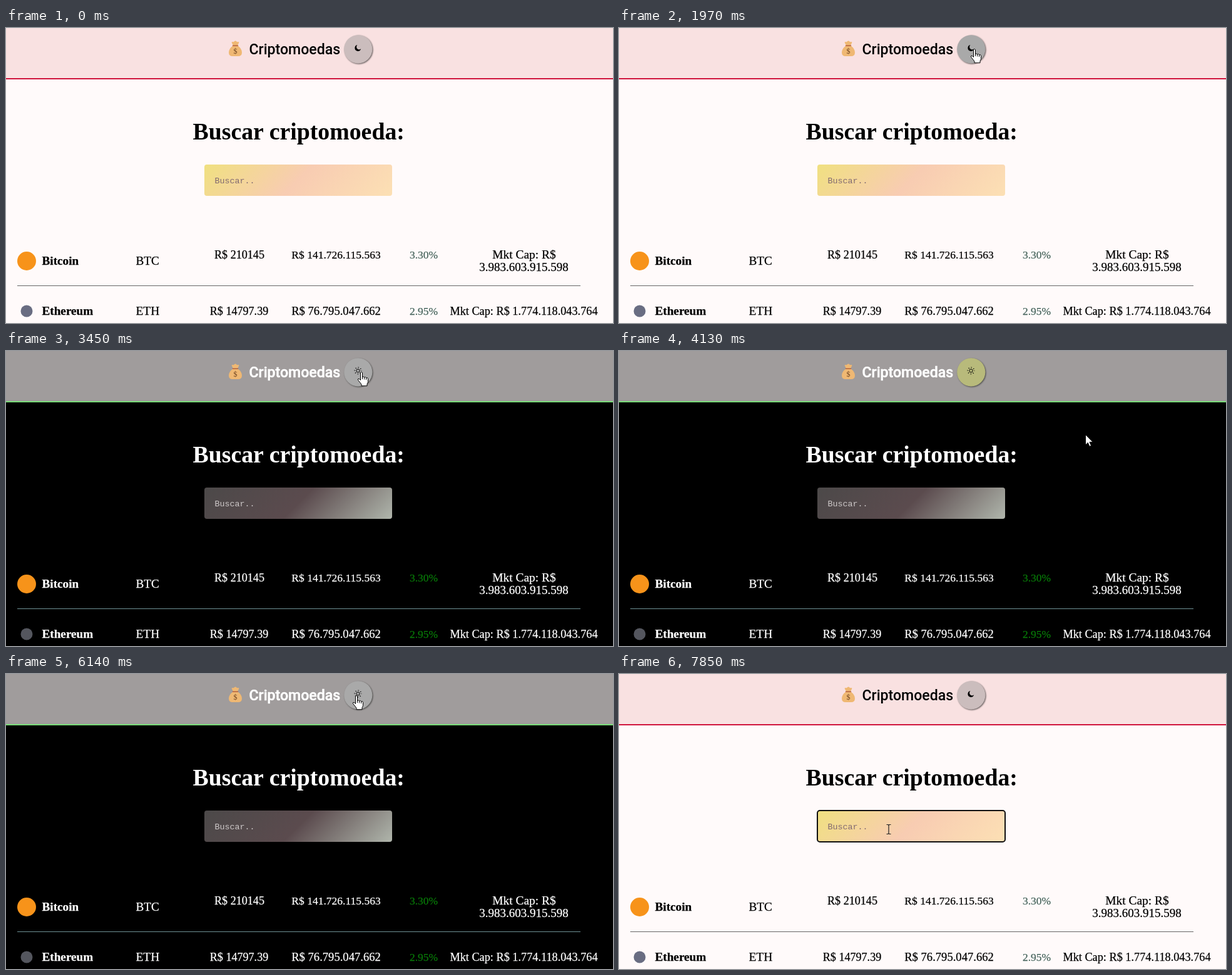
Recreate the animation shown at these times as an HTML page. Size 970 px wide and 471 px high, loop 8000 ms.

```html
<!DOCTYPE html>
<html lang="pt-BR">
<head>
<meta charset="utf-8">
<title>Criptomoedas</title>
<style>
  html, body { margin: 0; width: 100%; height: 100%; overflow: hidden; }
  svg {
    --page: #fffafa; --ink: #000; --header: #f9e1e1; --edge: #d0143c;
    --button: #cbbdbd; --shadow: #5c5555; --rule: #666; --gain: #46645c;
    --hint: #806870; --coin: #696d82;
    --from: #f0e080; --mid: #f8ccb2; --to: #fce0b4;
    display: block; background: var(--page); fill: var(--ink);
    font-family: "Liberation Serif", serif;
  }
  svg.dark {
    --page: #000; --ink: #fff; --header: #a09c9c; --edge: #78dc78;
    --button: #b8ba7b; --shadow: #4a4a48; --rule: #6f9296; --gain: #087a08;
    --hint: #cfcaca; --coin: #54565e;
    --from: #4c4949; --mid: #5b4b4e; --to: #b0b6ac;
  }
  svg.hover { --button: #a9a9a9; }
  .rows { stroke: var(--ink); stroke-width: .25; }
  .logo { font: 500 23.1px Roboto, sans-serif; }
  .dark .logo { stroke: var(--ink); stroke-width: .5; }
  .title { font-size: 37.8px; font-weight: bold; }
  .hint { font: 13.33px "Liberation Mono", monospace; fill: var(--hint); }
  .name { font-size: 19.2px; font-weight: bold; }
  .mid { text-anchor: middle; }
  .gain { fill: var(--gain); stroke: var(--gain); }
  .button { fill: var(--button); filter: drop-shadow(1px 1px 1px var(--shadow)); }
  .sun, .dark .moon { display: none; }
  .dark .sun { display: inline; }
  .sun { fill: none; stroke: #000; stroke-width: 1; }
  .moon { fill: #000; }
  #focus { fill: none; stroke: #101010; stroke-width: 2; }
  #arrow, #hand { fill: #fff; stroke: #000; stroke-width: 1; stroke-linejoin: round; }
  #beam { fill: none; stroke: #222; stroke-width: 1.2; }
</style>
</head>
<body>
<svg id="stage" width="970" height="471" viewBox="0 0 970 471">
  <defs>
    <linearGradient id="field" gradientUnits="userSpaceOnUse" x1="379.5" y1="155.5" x2="554.5" y2="330.5">
      <stop offset="0" stop-color="var(--from)"/>
      <stop offset=".5" stop-color="var(--mid)"/>
      <stop offset="1" stop-color="var(--to)"/>
    </linearGradient>
  </defs>

  <rect width="970" height="80" fill="var(--header)"/>
  <rect y="80" width="970" height="2" fill="var(--edge)"/>

  <!-- money bag -->
  <path d="M362 22q2 1 3-1 2-1 3 0 1 2 3 1 2 0 1 2l-2 4q7 5 7 11 0 6-6 6h-9q-6 0-6-6 0-6 7-11l-2-4q-1-2 1-2z" fill="#efb873"/>
  <path d="M362.5 28.3h8" stroke="#b5603c" stroke-width="1.6" stroke-linecap="round"/>
  <text class="mid" x="366.5" y="40.5" font-size="12" fill="#704522">$</text>
  <text class="logo" x="388.5" y="42">Criptomoedas</text>

  <circle class="button" cx="562.8" cy="33.8" r="22.6"/>
  <path class="moon" d="M561.5 27a5 5 0 1 0 5.7 6.3a4.2 4.2 0 0 1-5.7-6.3z"/>
  <g class="sun">
    <circle cx="562.5" cy="31.5" r="2.6"/>
    <circle cx="562.5" cy="31.5" r="5.2" stroke-width="1.8" stroke-dasharray="1 3.084" stroke-dashoffset=".5"/>
  </g>

  <text class="title" x="298.5" y="178">Buscar criptomoeda:</text>
  <rect x="317" y="218" width="300" height="50" rx="4" fill="url(#field)"/>
  <rect id="focus" x="317" y="218" width="300" height="50" rx="4"/>
  <text class="hint" x="333.5" y="248">Buscar..</text>

  <circle cx="33" cy="372" r="15" fill="#f7931a"/>
  <circle cx="33" cy="452" r="9.5" fill="var(--coin)"/>
  <rect x="18" y="411" width="900" height="1" fill="var(--rule)"/>

  <g class="rows">
    <text class="name" x="57.5" y="378">Bitcoin</text>
    <text x="207.5" y="378" font-size="19.2">BTC</text>
    <g class="mid" font-size="18.1">
      <text x="373" y="368">R$ 210145</text>
      <text x="527.5" y="368" font-size="17.5">R$ 141.726.115.563</text>
      <text x="667.5" y="368" font-size="17.5" class="gain">3.30%</text>
      <text x="828" y="368" font-size="19.4">Mkt Cap: R$</text>
      <text x="827.5" y="388" font-size="19">3.983.603.915.598</text>
    </g>
    <text class="name" x="57.5" y="458">Ethereum</text>
    <text x="207.5" y="458" font-size="19.4">ETH</text>
    <g class="mid" font-size="18.1">
      <text x="372.5" y="458">R$ 14797.39</text>
      <text x="527.5" y="458" font-size="18.6">R$ 76.795.047.662</text>
      <text x="667.5" y="458" font-size="17.5" class="gain">2.95%</text>
      <text x="827.5" y="458" font-size="18.25">Mkt Cap: R$ 1.774.118.043.764</text>
    </g>
  </g>

  <g id="cursor">
    <path id="arrow" d="M.5.5v16.5l3.8-3.6 2.6 6 2.7-1.2-2.6-5.8h5.2z"/>
    <g id="hand">
      <path d="M-1.5 1.5q1.5-2 3 0v7q2-1.2 3 .5 2-1 3 .7 3-.7 3 2v4q0 2-1.5 4v3h-9v-2.5l-5.5-7q-.5-2.5 2-1.7l2 2z"/>
      <path d="M1.500 8v4M4.500 9v3.500M7.500 10v3" fill="none"/>
    </g>
    <path id="beam" d="M-3.500-7.500h2.500l1 1 1-1h2.500M0-6.500v13M-3.500 7.500h2.500l1-1 1 1h2.500"/>
  </g>
</svg>
<script>
const LOOP = 8000, STEP = 70;
const DARK_ON = 3450, DARK_OFF = 6340, FOCUS_AT = 7850;

// pointer path: time, x, y
const path = [
  [880, 640, 250], [1090, 575, 110], [1360, 575, 110], [1430, 565, 69],
  [1970, 568, 33], [3660, 568, 33], [4130, 745, 133], [5050, 745, 133],
  [5460, 607, 66], [5670, 560, 34], [6620, 560, 34], [7040, 470, 200],
  [7250, 470, 200], [7320, 440, 235], [7450, 440, 235], [7520, 431, 248],
  [LOOP, 431, 248]
];
const el = id => document.getElementById(id);
const show = (id, on) => { el(id).style.display = on ? "inline" : "none"; };

// The pointer advances in discrete steps along each leg.
function pointerAt(t) {
  const i = path.findIndex(key => key[0] > t);
  if (i < 1) return null;
  const [t0, x0, y0] = path[i - 1], [t1, x1, y1] = path[i];
  const p = Math.min(1, Math.floor((t - t0) / STEP + 0.1) * STEP / (t1 - t0));
  return [Math.round(x0 + (x1 - x0) * p), Math.round(y0 + (y1 - y0) * p)];
}

function draw(t) {
  const pos = pointerAt(t);
  const [x, y] = pos || [-99, -99];
  const onButton = Math.hypot(x - 563, y - 34) < 23;
  const onField = x > 317 && x < 617 && y > 218 && y < 268;

  el("stage").classList.toggle("dark", t >= DARK_ON && t < DARK_OFF);
  el("stage").classList.toggle("hover", onButton);
  show("focus", t >= FOCUS_AT);
  show("cursor", pos);
  show("hand", onButton);
  show("beam", onField);
  show("arrow", !onButton && !onField);
  el("cursor").setAttribute("transform", `translate(${x} ${y})`);
}

const start = performance.now();
function tick() {
  draw((performance.now() - start) % LOOP);
  requestAnimationFrame(tick);
}
tick();
</script>
</body>
</html>
```
